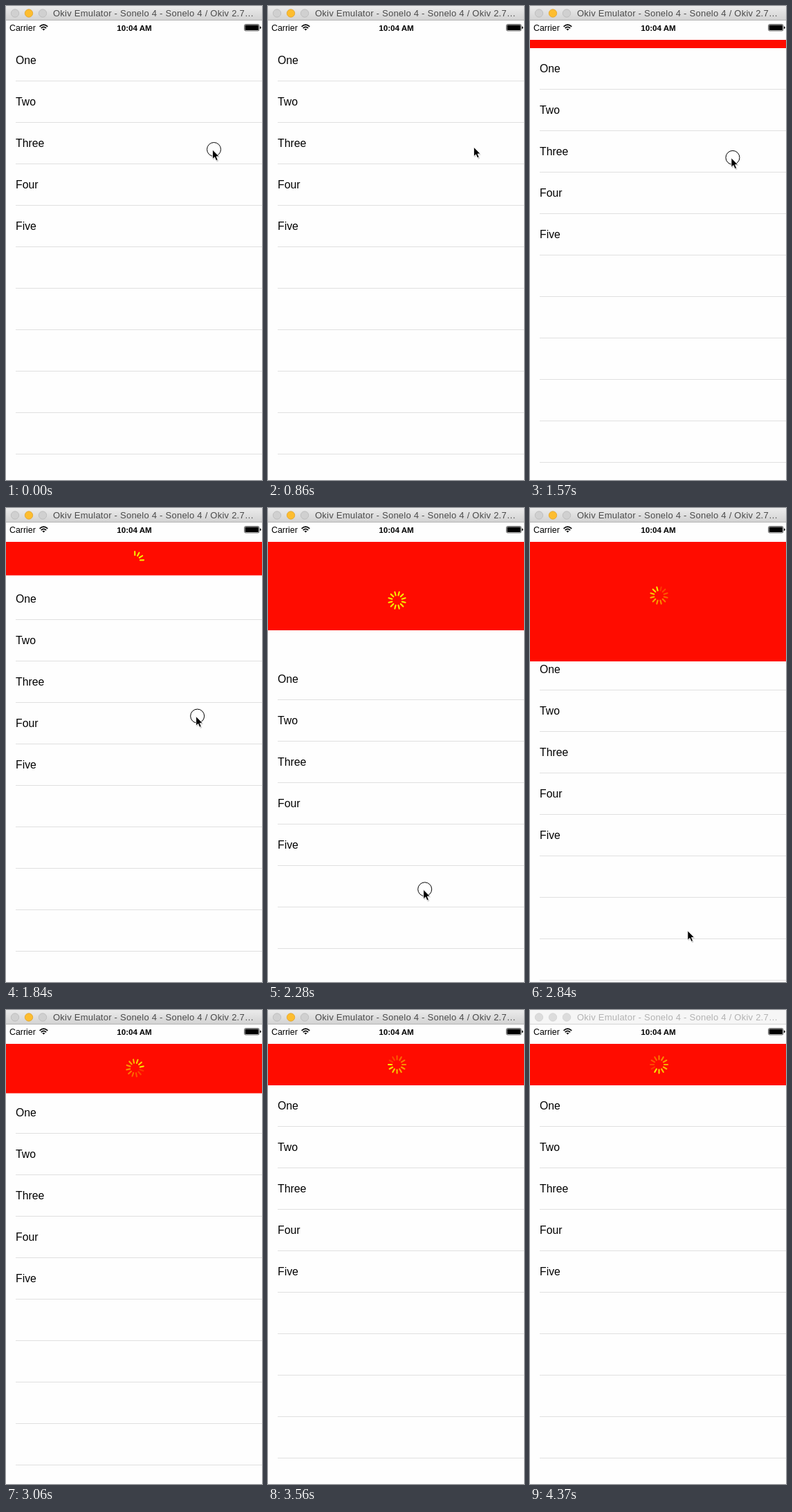
An HTML page that plays this animation: 370x686 px, repeating every 4400 ms.

```html
<!DOCTYPE html>
<html lang="en">
<head>
<meta charset="utf-8">
<title>Pull to refresh</title>
<style>
  html, body { margin: 0; width: 100%; height: 100%; overflow: hidden; background: #fefefe; }
  svg { display: block; width: 370px; height: 686px; font-family: "Liberation Sans", Arial, sans-serif; }
</style>
</head>
<body>
<svg viewBox="0 0 370 686" xmlns="http://www.w3.org/2000/svg">
  <defs>
    <linearGradient id="bar" x2="0" y2="1">
      <stop offset="0" stop-color="#ebebeb"/>
      <stop offset="1" stop-color="#d3d3d3"/>
    </linearGradient>
  </defs>
  <rect width="370" height="686" fill="#fefefe"/>
  <g id="list" font-size="15.8"></g>
  <rect id="red" y="49" width="370" fill="#ff0c00"/>
  <g id="spinner" stroke="#f6ee00" stroke-width="2.1" stroke-linecap="round"></g>

  <rect y="20" width="370" height="29" fill="#fefefe"/>
  <text x="5" y="35.5" font-size="12.4">Carrier</text>
  <g fill="none" stroke="#000" stroke-width="1.7">
    <path d="M48.6 29.8Q54.4 24.6 60.2 29.8M50.7 32.1Q54.4 28.8 58.1 32.1"/>
    <path d="M54.4 35.6L52.4 33.5Q54.4 31.9 56.4 33.5Z" fill="#000" stroke="none"/>
  </g>
  <text x="185.5" y="35.5" font-size="11.6" font-weight="bold" text-anchor="middle">10:04 AM</text>
  <rect x="344.5" y="26.5" width="21.5" height="9.5" rx="2" fill="none" stroke="#000" stroke-width=".6"/>
  <rect x="345.5" y="27.5" width="19.5" height="7.5" rx="1"/>
  <path d="M366.9 29.3Q368.6 29.6 368.6 31.2T366.9 33.2Z"/>

  <rect id="head" width="370" height="20"/>
  <rect id="edge" y="20" width="370" height="1"/>
  <g id="lights" stroke-width=".8"></g>
  <text id="title" x="68" y="15" font-size="13" letter-spacing=".24">Okiv Emulator - Sonelo 4 - Sonelo 4 / Okiv 2.7…</text>

  <g id="pointer">
    <circle id="ring" r="10" fill="none" stroke="#000"/>
    <path d="M-1 2V15.5L2 12.8L4.2 18L6.8 17L4.6 11.8H8.6Z" opacity=".18"/>
    <path d="M-2 .5V14L1.1 11.2L3.2 16.2L5.6 15.2L3.5 10.3H7.6Z" stroke="#fff" stroke-width=".8"/>
  </g>
</svg>
<script>
const LOOP = 4400, LIFT = 50, PRESS = 1030, GRAB = 1330, RELEASE = 2808, BLUR = 4370;
const REST = 60, TOP = 49;
const $ = id => document.getElementById(id);

function set(node, attrs) {
  for (const key in attrs) node.setAttribute(key, attrs[key]);
}

function add(parent, tag, attrs, text = '') {
  const node = document.createElementNS('http://www.w3.org/2000/svg', tag);
  set(node, attrs);
  node.textContent = text;
  return parent.appendChild(node);
}

// 0 to 1 between two times
const ramp = (t, a, b) => Math.min(1, Math.max(0, (t - a) / (b - a)));

// How far the hand has gone on its way down, 0 to 1
const swing = t => t < GRAB ? 0 : 1 / (1 + Math.exp((2009 - t) / 154));

const hand = t => ({
  x: 300.5 - 3 * ramp(t, 770, PRESS) - 83 * swing(t) + 15 * ramp(t, 2280, 2600),
  y: 207.5 - 11 * ramp(t, 770, PRESS) + 416 * swing(t) + 90 * ramp(t, 2840, 2980)
});

// The list follows the hand with growing resistance
function pull(t) {
  const drag = 416 * swing(t);
  return drag * (.524 - .000135 * drag);
}

// The red panel trails behind the list
const panel = t => pull(t - 190 * ramp(t, 1790, 2280));

// Follows a motion until it is let go, then falls back to the rest height
const settle = (motion, t, end) => t < end ? motion(t)
  : REST + (motion(end) - REST) * Math.exp((end - t) / 97);

['One', 'Two', 'Three', 'Four', 'Five'].forEach((name, i) =>
  add($('list'), 'text', { x: 14, y: 84 + i * 60 }, name));
for (let i = 0; i < 10; i++)
  add($('list'), 'rect', { x: 14, y: 108 + i * 60, width: 356, height: 1, fill: '#e0e0e0' });

const spokes = Array.from({ length: 12 }, (_, i) =>
  add($('spinner'), 'path', { d: 'M0 -7.4V-12.5', transform: `rotate(${i * 30})` }));
const lights = [13, 33, 53].map(x => add($('lights'), 'circle', { cx: x, cy: 10.5, r: 5.7 }));

function drawBar(active) {
  set($('head'), { fill: active ? 'url(#bar)' : '#f6f6f6' });
  set($('edge'), { fill: active ? '#b4b4b4' : '#d4d4d4' });
  set($('title'), { fill: active ? '#4a4a4a' : '#b2b2b2' });
  set($('lights'), active ? { fill: '#d0d0d0', stroke: '#b8b8b8' } : { fill: '#dcdcdc', stroke: '#d0d0d0' });
  set(lights[1], active ? { fill: '#fdbd2f', stroke: '#e0a028' } : { fill: 'inherit', stroke: 'inherit' });
}

function drawSpinner(t, shift) {
  const lead = Math.floor((t - RELEASE) * 12 / 1000 + .32);
  const tilt = 15 * (ramp(t, 2900, 3560) - ramp(t, 1790, 2280));
  set($('spinner'), { transform: `translate(186.5 ${TOP + shift / 2}) rotate(${tilt})` });
  spokes.forEach((spoke, i) => {
    const age = ((lead - i) % 12 + 12) % 12;
    const shown = (i + 1) * 13 <= shift ? 1 : 0;
    set(spoke, { opacity: t < RELEASE ? shown : 1 - age * .073 });
  });
}

function draw(t) {
  const shift = settle(pull, t, RELEASE);
  const { x, y } = hand(t);
  set($('list'), { transform: `translate(0 ${Math.round(shift)})` });
  set($('red'), { height: Math.round(settle(panel, t, RELEASE + 18) * 2) / 2 });
  drawSpinner(t, shift);
  drawBar(t < BLUR);
  set($('pointer'), { transform: `translate(${x} ${y})`, opacity: t < 2980 ? 1 : 0 });
  set($('ring'), { opacity: t < LIFT || (t >= PRESS && t < RELEASE) ? 1 : 0 });
}

const start = performance.now();
function loop() {
  draw((performance.now() - start) % LOOP);
  requestAnimationFrame(loop);
}
loop();
</script>
</body>
</html>
```
